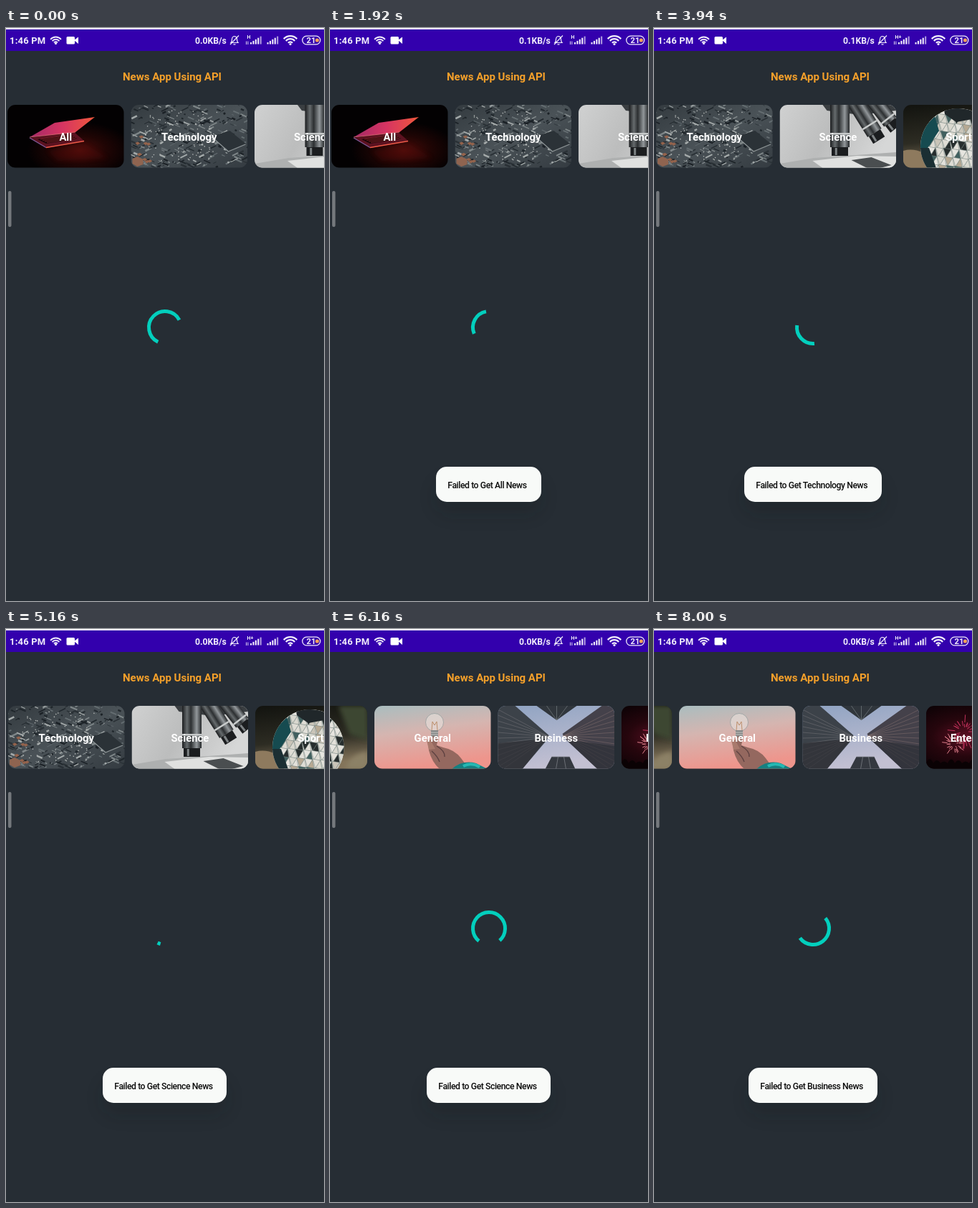
These frames come from a looping animation (444 px wide and 798 px high, 8100 ms). An HTML page:

```html
<!DOCTYPE html>
<html lang="en">
<head>
<meta charset="utf-8">
<title>News app</title>
<style>
  html, body { margin: 0; width: 100%; height: 100%; overflow: hidden; background: #262d34; }
  svg { display: block; width: 444px; height: 798px; font-family: Roboto, "Open Sans", sans-serif; }
  .label { font-weight: 700; font-size: 14.8px; fill: #fff; text-anchor: middle; }
  .toast { font-size: 12.2px; font-weight: 500; letter-spacing: -.42px; fill: #0c0c0c; }
  .status { font-weight: 600; fill: #f1edfb; }
</style>
</head>
<body>
<svg viewBox="0 0 444 798" xmlns="http://www.w3.org/2000/svg">
  <defs>
    <clipPath id="card"><rect width="162.5" height="87.5" rx="11"/></clipPath>
    <clipPath id="ball"><circle cx="77" cy="58" r="53"/></clipPath>
    <filter id="blur" x="-40%" y="-80%" width="180%" height="260%"><feGaussianBlur stdDeviation="12"/></filter>
    <filter id="soft" x="-30%" y="-30%" width="160%" height="160%"><feGaussianBlur stdDeviation="3"/></filter>
    <linearGradient id="lid" x2="1" y2="0">
      <stop stop-color="#a32a66"/><stop offset=".5" stop-color="#d63462"/><stop offset="1" stop-color="#f0583c"/>
    </linearGradient>
    <radialGradient id="glow" cx=".62" cy=".72" r=".45">
      <stop stop-color="#4c0d0a"/><stop offset=".5" stop-color="#200504"/><stop offset="1" stop-color="#030102"/>
    </radialGradient>
    <linearGradient id="board" x2="1" y2="1">
      <stop stop-color="#343b40"/><stop offset=".5" stop-color="#4a5257"/><stop offset="1" stop-color="#343b41"/>
    </linearGradient>
    <linearGradient id="lab" x2="1" y2=".3">
      <stop stop-color="#d0d1d1"/><stop offset=".5" stop-color="#bcbdbd"/><stop offset="1" stop-color="#d6d7d7"/>
    </linearGradient>
    <linearGradient id="metal">
      <stop stop-color="#1b1d1f"/><stop offset=".25" stop-color="#666b6d"/><stop offset=".45" stop-color="#2c2f31"/>
      <stop offset=".75" stop-color="#92979a"/><stop offset="1" stop-color="#25282a"/>
    </linearGradient>
    <linearGradient id="pitch" y2="1" x2=".2">
      <stop stop-color="#12130f"/><stop offset=".6" stop-color="#2d2c23"/><stop offset="1" stop-color="#83745a"/>
    </linearGradient>
    <linearGradient id="dusk" x2=".25" y2="1">
      <stop stop-color="#a9bdbf"/><stop offset=".45" stop-color="#d5b5b0"/><stop offset="1" stop-color="#ee958c"/>
    </linearGradient>
    <linearGradient id="sky" x2=".3" y2="1">
      <stop stop-color="#8fa3c2"/><stop offset="1" stop-color="#c3c0d2"/>
    </linearGradient>
    <radialGradient id="night" cx=".35" cy=".5" r=".6">
      <stop stop-color="#5c1024"/><stop offset=".5" stop-color="#26060d"/><stop offset="1" stop-color="#0b0205"/>
    </radialGradient>
  </defs>
  <rect width="444" height="798" fill="#262d34"/>
  <rect width="444" height="32" fill="#3300ad"/>
  <rect width="444" height="2" fill="#f4f2fa"/>
  <g id="statusBar"></g>
  <text x="163" y="73" font-size="15" font-weight="700" fill="#f5a02a">News App Using API</text>
  <g id="cards"></g>
  <rect x="3" y="227" width="4.5" height="50" rx="2" fill="#74787c"/>
  <path id="spinner" fill="none" stroke="#03cfbd" stroke-width="5"/>
  <g id="toast">
    <rect id="shade" y="630" height="46" rx="20" fill="#101318" opacity=".2" filter="url(#blur)"/>
    <rect id="bubble" y="611" height="49" rx="15" fill="#f8faf8"/>
    <text id="message" class="toast" y="640.5"></text>
  </g>
</svg>
<script>
const $ = id => document.getElementById(id);
const LOOP = 8100, PITCH = 172.5;

function seeded(seed) {
  return () => (seed = seed * 16807 % 2147483647) / 2147483647;
}
const repeat = (n, draw) => Array.from({ length: n }, (_, i) => draw(i)).join('');
const shape = (d, fill, extra = '') => `<path d="${d}" fill="${fill}" ${extra}/>`;
const line = (d, color, width = 1, extra = '') =>
  `<path d="${d}" fill="none" stroke="${color}" stroke-width="${width}" ${extra}/>`;
const fill = color => `<rect width="163" height="88" fill="${color}"/>`;

function laptop() {
  return fill('url(#glow)') +
    shape('M56 64L108 54L140 74L70 78Z', '#5a0d0b', 'opacity=".3" filter="url(#soft)"') +
    shape('M31 46L92 37L107 50L54 60Z', '#5c1220') +
    shape('M42 48L88 41L97 47L54 54Z', '#1c0508') +
    repeat(4, i => line(`M${46 + i * 3} ${48 + i * 1.5}L${88 + i * 2.5} ${41.5 + i * 1.5}`, '#a32c30', .7)) +
    line('M31 46L54 59.5', '#7e5a9a', 1.4) + line('M54 59.5L107 50.5', '#ee5a48', 1.6) +
    shape('M31 45L66 25L122 17L95 38L85 39Z', 'url(#lid)') +
    line('M31 45L85 39L95 38', '#f07a80', .7);
}

function circuit() {
  const rnd = seeded(77);
  const colors = ['#646d71', '#7f8789', '#20272c', '#a3a9a9', '#1b2126', '#2a3136'];
  const parts = repeat(300, i => {
    const x = rnd() * 170 - 4, y = rnd() * 88, w = 2 + rnd() * 8;
    const slope = rnd() < .55 ? .42 : -.5;
    return line(`M${x.toFixed(1)} ${y.toFixed(1)}l${w.toFixed(1)} ${(w * slope).toFixed(1)}`, colors[i % 6], .7 + rnd() * 2);
  });
  const pins = repeat(100, () =>
    `<circle cx="${(20 + rnd() * 100).toFixed(1)}" cy="${(8 + rnd() * 70).toFixed(1)}" r=".8" fill="#b6bab8"/>`);
  const copper = repeat(9, () =>
    shape(`M${(rnd() * 24).toFixed(1)} ${(40 + rnd() * 42).toFixed(1)}l4-1.5 3 2-4 2.5z`, '#94634c'));
  return fill('url(#board)') + parts + pins + copper +
    shape('M112 44L138 36L160 54L136 64Z', '#2b3237') + line('M112 44L136 65L160 55', '#8b9294', 1.2) +
    shape('M2 75l7-3 8 4v7l-8 3-7-4z', '#8f6450');
}

function microscope() {
  const lens = (x, turn, length, width) => `<g transform="translate(${x} 0) rotate(${turn})">
    <rect x="${-width / 2}" y="-16" width="${width}" height="${length + 4}" fill="url(#metal)"/>
    <rect x="${-width / 2}" y="${length * .55}" width="${width}" height="2.5" fill="#c9cccc"/>
    <rect x="${-width / 2 + 2}" y="${length - 12}" width="${width - 4}" height="12" fill="#1b1d1f"/>
    <rect x="${-width / 4}" y="${length - 11}" width="3" height="10" fill="#7d8284"/></g>`;
  return fill('url(#lab)') +
    shape('M0 88V82L48 74L163 66V88Z', '#aeb0b0') +
    shape('M46 78L108 71L163 72V88H60Z', '#e0e1e0') +
    shape('M100 77L128 73L156 84L140 88H122Z', '#4a4e50') +
    shape('M60 0H163V8L112 14L66 8Z', '#3a3e41') +
    lens(136, -38, 42, 22) + lens(108, -32, 58, 23) + lens(84, 0, 71, 27);
}

function football() {
  const rnd = seeded(19);
  const tones = ['#d9d8cf', '#e6e5df', '#c9c4b8', '#dfddd5', '#b7a993', '#41605f', '#e3e1da', '#262d2d'];
  // Triangular tiles, two to a cell, leaning with the curve of the ball.
  const tiles = repeat(80, i => {
    const col = i % 10, row = Math.floor(i / 10), x = 24 + col * 11 + row * 2, y = row * 12 - 2 + col;
    const tone = () => tones[Math.floor(rnd() * tones.length)];
    return shape(`M${x} ${y}l11 2-7 11z`, tone(), 'stroke="#6d7c79" stroke-width=".5"') +
      shape(`M${x + 11} ${y + 2}l2 12-9-1z`, tone(), 'stroke="#6d7c79" stroke-width=".5"');
  });
  return fill('url(#pitch)') +
    shape('M0 88V64Q14 60 28 67L34 88Z', '#8e7a5e') +
    shape('M122 0H163V48L138 40Z', '#3c4733', 'filter="url(#soft)"') +
    shape('M132 88Q140 66 163 64V88Z', '#8c8166', 'filter="url(#soft)"') +
    `<g clip-path="url(#ball)">${fill('#dcdcd5')}${tiles}` +
    shape('M20 62Q24 34 44 16L50 36L34 60Z', '#164b50') +
    shape('M56 0H104L96 20L74 24L58 13Z', '#20272a') +
    shape('M24 60L36 60L46 88H24Z', '#1b2f33') + '</g>';
}

function bulb() {
  return fill('url(#dusk)') +
    `<circle cx="84" cy="23" r="12.5" fill="#e6dfda" opacity=".65" stroke="#8f9c9d"/>` +
    line('M80 34L81 22L84 27L87 22L88 34', '#b98863', .9) +
    shape('M79 34h10v9h-10z', '#858787') + line('M79 37h10M79 40h10', '#c6c7c4', 1) +
    shape('M76 62Q74 51 82 42L89 45L87 55L96 58Q112 61 121 73L132 88H91Q80 78 76 62Z', '#94685f') +
    shape('M76 61L73 48Q75 44 79 49L85 60Z', '#a97a6d') +
    line('M87 56Q99 63 98 71M80 63Q88 70 91 78', '#5e4141', 1.4) +
    shape('M108 88Q123 75 142 80L158 88Z', '#167f80') + line('M124 84Q135 78 147 85', '#25b8b3', 4);
}

function towers() {
  const ribs = (tipX, tipY, edge, color) => repeat(12, i =>
    line(`M${edge} ${5 + i * 8}L${tipX} ${tipY}`, color, .7, 'opacity=".65"'));
  const left = 'M0 0H24L71 41L68 48L34 88H0Z', right = 'M163 0H145L90 39L95 47L139 88H163Z';
  return fill('url(#sky)') +
    shape(left, '#3c4249') + ribs(71, 43, 0, '#7d7c80') +
    shape('M0 52L68 46L34 88H0Z', '#302f35', 'opacity=".7"') +
    shape(right, '#44414a') + ribs(91, 42, 163, '#8a7472') +
    shape('M163 56L95 47L139 88H163Z', '#2d3037', 'opacity=".7"') +
    shape('M54 0H110L82 20Z', '#30363c') + line('M68 0L82 20L97 0M82 0V20', '#6d7478', .8) +
    shape('M66 88L75 71H100L108 88Z', '#34383f') + line('M75 71L100 71M84 71L81 88M92 71L95 88', '#797d83', .8);
}

function fireworks() {
  const rnd = seeded(31);
  const burst = (x, y, size, color) => repeat(34, () => {
    const a = rnd() * 6.283, r = size * (.35 + rnd() * .65);
    const at = k => `${(x + r * k * Math.cos(a)).toFixed(1)} ${(y + r * k * Math.sin(a)).toFixed(1)}`;
    return line(`M${at(.55)}L${at(1)}`, color, 1);
  });
  return fill('url(#night)') + burst(53, 36, 27, '#c2315b') + burst(39, 53, 18, '#e0808c') +
    burst(106, 31, 25, '#a92845') +
    shape('M0 88V79' + repeat(16, i => `Q${i * 10 + 5} ${69 + i % 3 * 3} ${i * 10 + 10} 80`) + 'V88Z', '#0a0204');
}

const CARDS = [
  ['All', laptop], ['Technology', circuit], ['Science', microscope], ['Sports', football],
  ['General', bulb], ['Business', towers], ['Entertainment', fireworks]
];
$('cards').innerHTML = CARDS.map(([name, art], i) => `<g transform="translate(${2 + i * PITCH} 107)">
  <g clip-path="url(#card)">${art()}</g><text class="label" x="81.3" y="49.8">${name}</text></g>`).join('');

function wifi(x, y, size) {
  return repeat(3, i => {
    const r = size * (i + 1) / 3, dx = r * .74, dy = r * .67;
    return line(`M${x - dx} ${y - dy}A${r} ${r} 0 0 1 ${x + dx} ${y - dy}`, '#f1edfb', size / 5.5);
  }) + `<circle cx="${x}" cy="${y - 1}" r="1.6" fill="#f1edfb"/>`;
}
const bars = x => repeat(5, i =>
  `<rect x="${x + i * 3.4}" y="${20 - i * 2.1}" width="2.1" height="${2.5 + i * 2.1}" fill="#f1edfb" opacity="${i > 3 ? .65 : 1}"/>`);

$('statusBar').innerHTML = `
  <text class="status" x="5" y="22" font-size="13" letter-spacing=".2">1:46 PM</text>
  ${wifi(69.5, 22.5, 10)}
  <rect x="84.5" y="12" width="11.5" height="10.5" rx="1.5" fill="#fff"/>${shape('M95 17L101 12.5V22Z', '#fff')}
  <text id="rate" class="status" x="264" y="21.5" font-size="12.2"></text>
  ${line('M314 20.5Q315.5 19 315.5 15.5Q316 11.5 319 11.5Q322.5 12 322.5 16Q322.5 19 324 20.5ZM317.5 22.8H320.5M313 23L325 10.5', '#f1edfb', 1.2)}
  <text id="network" class="status" x="336.5" y="15" font-size="7"></text>
  ${line('M335.5 18.5V23M337.8 18.5V23', '#f1edfb', .9)}
  ${bars(341)}${bars(364.5)}${wifi(397, 23.5, 12.5)}
  <rect x="413.8" y="11.2" width="25" height="11.6" rx="5.8" fill="none" stroke="#f1edfb" stroke-width="1.3"/>
  <circle cx="434.5" cy="17" r="2.6" fill="#f0a05a"/>
  <text class="status" x="426" y="21.2" font-size="11.3" text-anchor="middle">21</text>`;

const clamp = v => Math.max(0, Math.min(1, v));

// Fast-out, slow-in: cubic-bezier(.4, 0, .2, 1)
function ease(x) {
  if (x <= 0 || x >= 1) return clamp(x);
  let low = 0, high = 1;
  for (let i = 0; i < 24; i++) {
    const u = (low + high) / 2, v = 1 - u;
    if (1.2 * u * v * v + .6 * u * u * v + u * u * u < x) low = u; else high = u;
  }
  return low * low * (3 - 2 * low);
}

function track(keys, x, curve = k => k) {
  const next = keys.findIndex(key => key[0] > x);
  if (next < 0) return keys[keys.length - 1][1];
  if (next === 0) return keys[0][1];
  const [x0, y0] = keys[next - 1], [x1, y1] = keys[next];
  return y0 + (y1 - y0) * curve((x - x0) / (x1 - x0));
}

function tick(t) {
  if (t < 800) return { step: 0, time: 0 };
  const round = Math.floor((t - 800) / 1720), rest = (t - 800) % 1720;
  const n = rest < 320 ? Math.min(2, Math.floor(rest / 100)) : Math.floor((rest - 20) / 100);
  return { step: 1 + round * 17 + n, time: 800 + round * 1720 + n * 100 + (n > 2 ? 20 : 0) };
}

const TURNS = [[0, -3.755], [12, -1.855], [24, -.02], [32, 1.145], [44, 2.98], [54, 4.52], [72, 7.207]];
const SCROLL = [[3340, 0], [3840, 171.5], [5460, 171.5], [6160, 630], [6680, 657]];
const TOASTS = [
  { topic: 'All', from: 900, to: 2640, x: 148, width: 147 },
  { topic: 'Technology', from: 2840, to: 4640, x: 126, width: 192 },
  { topic: 'Science', from: 4960, to: 6780, x: 135, width: 173 },
  { topic: 'Business', from: 7380, to: 9000, x: 132, width: 180 }
];

function drawSpinner(step) {
  const turn = track(TURNS, step), phase = turn - Math.floor(turn);
  const grow = ease(phase * 2), shrink = ease(phase * 2 - 1);
  const start = 184.7 + 216 * turn + 90 * phase + 270 * shrink;
  const sweep = 270 * (grow - shrink) + 10.8;
  const point = deg => {
    const a = deg * Math.PI / 180;
    return `${222 + 22.5 * Math.cos(a)} ${417 + 22.5 * Math.sin(a)}`;
  };
  $('spinner').setAttribute('d', `M${point(start)}A22.5 22.5 0 ${sweep > 180 ? 1 : 0} 1 ${point(start + sweep)}`);
}

function drawToast(time) {
  const toast = TOASTS.find(({ from, to }) => time >= from && time < to + 150);
  $('toast').setAttribute('opacity', toast ? Math.min(clamp((time - toast.from) / 150), clamp((toast.to + 150 - time) / 150)) : 0);
  if (!toast) return;
  for (const id of ['shade', 'bubble']) {
    $(id).setAttribute('x', toast.x);
    $(id).setAttribute('width', toast.width);
  }
  $('message').setAttribute('x', toast.x + 16.3);
  $('message').textContent = `Failed to Get ${toast.topic} News`;
}

function render(now) {
  const { step, time } = tick(now % LOOP);
  drawSpinner(step);
  drawToast(time);
  $('cards').setAttribute('transform', `translate(${-track(SCROLL, time, k => 1 - (1 - k) ** 2)} 0)`);
  $('rate').textContent = time >= 1000 && time < 4640 ? '0.1KB/s' : '0.0KB/s';
  $('network').textContent = time < 2720 ? 'H' : 'H+';
}

const begin = performance.now();
function loop() {
  render(performance.now() - begin);
  requestAnimationFrame(loop);
}
loop();
</script>
</body>
</html>
```
